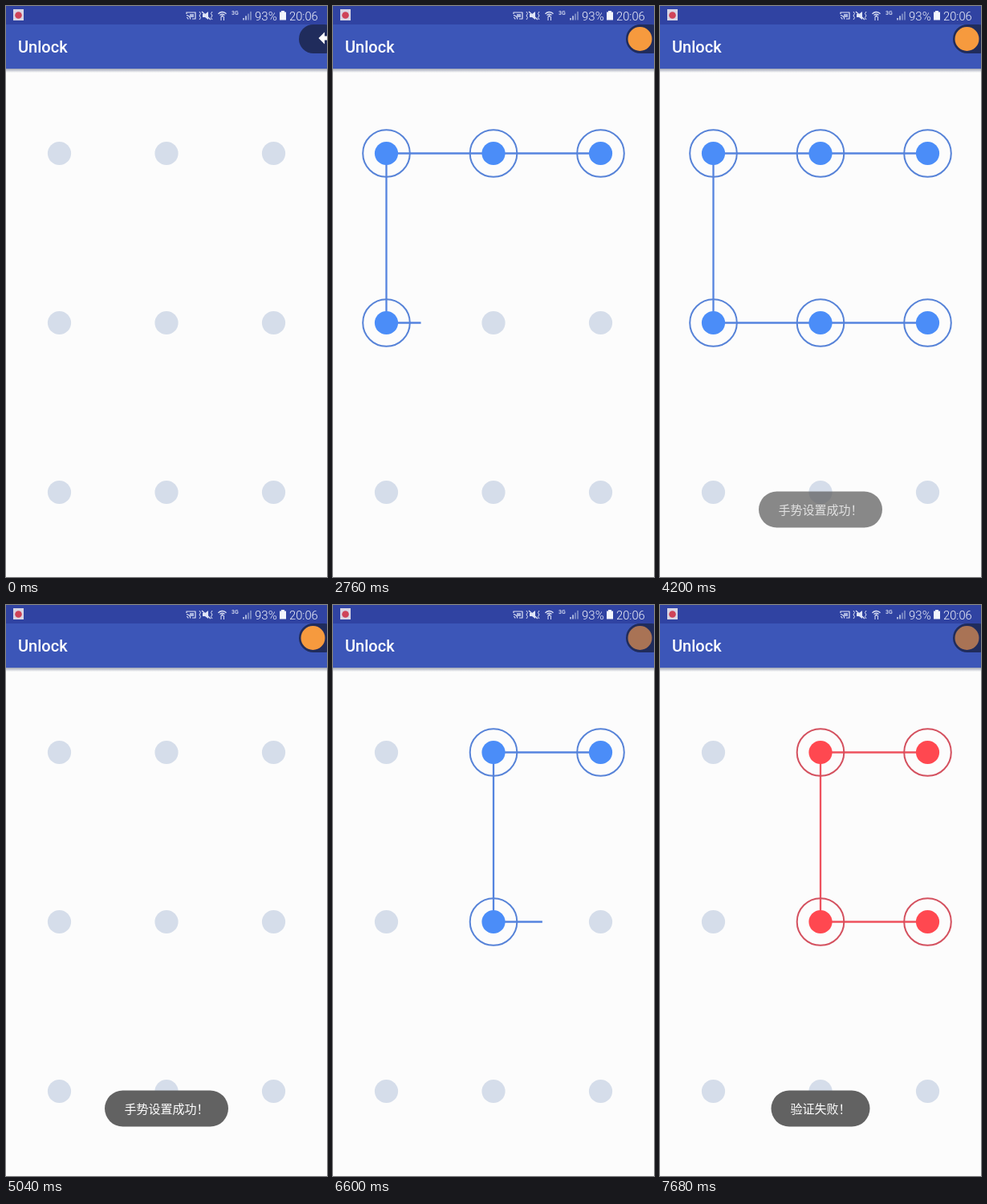
An HTML page with a canvas that plays this animation: 400x711 px, repeating every 8 s.

```html
<!DOCTYPE html>
<html lang="en">
<head>
<meta charset="utf-8">
<title>Unlock</title>
<style>
html, body { margin: 0; width: 100%; height: 100%; overflow: hidden; background: #fcfcfc; }
canvas { display: block; }
</style>
</head>
<body>
<canvas id="stage" width="400" height="711"></canvas>
<script>
const ctx = document.getElementById('stage').getContext('2d');
const LOOP = 8000, STEP = 120;
const COLS = [66.5, 200, 333.5], ROWS = [183.5, 394.5, 605.5];
const NODES = ROWS.flatMap(y => COLS.map(x => ({ x, y })));
const BLUE = { dot: '#4b8df8', ring: '#5783d8', line: '#5584df' };
const RED = { dot: '#ff4850', ring: '#d4515f', line: '#ee525e' };

// Finger stops: [time, node index]
const GESTURES = [
  { stops: [[840, 2], [1220, 1], [1620, 0], [1740, 0], [2400, 3], [2540, 3], [3120, 4], [3660, 5]],
    release: 3840, clear: 5040, result: BLUE },
  { stops: [[5400, 2], [5800, 1], [5920, 1], [6360, 4], [6440, 4], [6780, 5]],
    release: 6840, clear: LOOP, result: RED }
];
const TOASTS = [
  { text: '手势设置成功！', width: 154, start: 3840, end: 5640 },
  { text: '验证失败！', width: 123, start: 6800, end: 9000 }
];

const clamp = v => Math.max(0, Math.min(1, v));
const ease = v => v * v * (3 - 2 * v);

function circle(x, y, r, fill) {
  ctx.beginPath();
  ctx.arc(x, y, r, 0, Math.PI * 2);
  ctx.fillStyle = fill;
  ctx.fill();
}

function rect(x, y, w, h, fill) {
  ctx.fillStyle = fill;
  ctx.fillRect(x, y, w, h);
}

function stroke(points, color, width) {
  ctx.beginPath();
  points.forEach(([x, y]) => ctx.lineTo(x, y));
  ctx.strokeStyle = color;
  ctx.lineWidth = width;
  ctx.stroke();
}

function polygon(points, fill) {
  ctx.beginPath();
  points.forEach(([x, y]) => ctx.lineTo(x, y));
  ctx.fillStyle = fill;
  ctx.fill();
}

function label(text, x, y, font, fill) {
  ctx.font = font;
  ctx.fillStyle = fill;
  ctx.fillText(text, x, y);
}

function arc(x, y, r, from, to, color, width = 1.2) {
  ctx.beginPath();
  ctx.arc(x, y, r, from, to);
  ctx.strokeStyle = color;
  ctx.lineWidth = width;
  ctx.stroke();
}

function drawStatusBar() {
  const ink = '#dfe4f6';
  rect(0, 0, 400, 23, '#3043a2');
  rect(9, 4, 13, 14, '#d8d5e4');
  circle(15.5, 11.5, 4.3, '#cf4358');

  // Cast
  stroke([[225, 10], [225, 8], [236, 8], [236, 16], [232, 16]], ink, 1.2);
  arc(225, 16.5, 2, -Math.PI / 2, 0, ink);
  arc(225, 16.5, 4.8, -Math.PI / 2, 0, ink);
  rect(229, 10, 5, 4, '#aab5e0');

  // Muted, vibrating
  for (const [x, d] of [[241, 1], [257, -1]])
    stroke([[x, 7], [x + d * 1.5, 9.5], [x, 12], [x + d * 1.5, 14.5], [x, 17]], ink, 1);
  polygon([[245, 10], [248, 10], [252, 7], [252, 17], [248, 14], [245, 14]], ink);
  stroke([[244, 7], [255, 17]], ink, 1.4);

  // Wireless
  arc(269.5, 14, 6.5, -2.45, -0.7, ink, 1.4);
  arc(269.5, 14, 3.8, -2.45, -0.7, ink, 1.4);
  circle(269.5, 12.5, 1.2, ink);
  stroke([[268, 13], [268, 18]], ink, 1);
  stroke([[271.5, 13], [271.5, 18]], ink, 1);

  label('3G', 281, 11, '500 7px Roboto, sans-serif', ink);
  for (let i = 0; i < 4; i++)
    rect(295 + i * 3, 15 - i * 2.7, 2, 2.5 + i * 2.7, i < 2 ? '#a9b4de' : '#7484c2');
  label('93%', 310, 17.5, '300 15px Roboto, sans-serif', '#f0f2fb');
  rect(341, 7.5, 8, 10, '#f3f5fc');
  rect(343, 6, 4, 2, '#f3f5fc');
  label('20:06', 353, 17.5, '300 14.7px Roboto, sans-serif', '#f0f2fb');
}

function drawAppBar() {
  rect(0, 23, 400, 55, '#3c56b8');
  const shade = ctx.createLinearGradient(0, 78, 0, 83);
  shade.addColorStop(0, 'rgba(70,80,110,.5)');
  shade.addColorStop(1, 'rgba(70,80,110,0)');
  rect(0, 78, 400, 5, shade);
  label('Unlock', 15, 58, '500 20px Roboto, sans-serif', '#fff');
}

function drawBadge(t) {
  ctx.beginPath();
  ctx.roundRect(365, 23, 50, 36, 18);
  ctx.fillStyle = '#202c5c';
  ctx.fill();
  if (t < 120) {
    polygon([[389.5, 40], [397, 32.5], [397, 37.5], [400, 37.5], [400, 42.5], [397, 42.5], [397, 47.5]], '#fff');
  } else {
    circle(382.5, 41, 15, t < 5400 ? '#f69a3e' : '#a97355');
  }
}

function fingerAt(stops, t) {
  const next = stops.findIndex(s => s[0] > t);
  if (next < 0) return NODES[stops[stops.length - 1][1]];
  const [t0, from] = stops[next - 1], [t1, to] = stops[next];
  const k = ease((t - t0) / (t1 - t0)), a = NODES[from], b = NODES[to];
  return { x: a.x + (b.x - a.x) * k, y: a.y + (b.y - a.y) * k };
}

function drawPattern(t) {
  const gesture = GESTURES.find(g => t >= g.stops[0][0] && t < g.clear);
  let lit = [], colors = BLUE, path = [];
  if (gesture) {
    const held = t < gesture.release;
    const finger = fingerAt(gesture.stops, t);
    const near = n => Math.hypot(n.x - finger.x, n.y - finger.y) < 30;
    lit = gesture.stops.filter(([time, i]) => time <= t || (time - t < 400 && near(NODES[i])))
      .map(([, i]) => NODES[i]);
    colors = held ? BLUE : gesture.result;
    path = held ? [...lit, finger] : lit;
  }
  if (path.length > 1) {
    ctx.lineJoin = 'round';
    stroke(path.map(n => [n.x, n.y]), colors.line, 2.3);
  }
  for (const n of NODES) {
    const on = lit.includes(n);
    if (on) arc(n.x, n.y, 29.3, 0, Math.PI * 2, colors.ring, 2);
    circle(n.x, n.y, 14.6, on ? colors.dot : '#d5ddea');
  }
}

function drawToast({ text, width, start, end }, t) {
  const alpha = Math.min(clamp((t - start) / 480), 1 - clamp((t - end) / 400));
  if (alpha <= 0) return;
  ctx.save();
  ctx.globalAlpha = alpha;
  ctx.beginPath();
  ctx.roundRect(200 - width / 2, 604.5, width, 45, 22.5);
  ctx.fillStyle = '#626262';
  ctx.fill();
  ctx.textAlign = 'center';
  label(text, 200, 633, '300 15px "Noto Sans CJK SC", "Noto Sans CJK", sans-serif', '#fff');
  ctx.restore();
}

function render(now) {
  const t = Math.floor((now % LOOP) / STEP) * STEP;
  rect(0, 0, 400, 711, '#fcfcfc');
  drawStatusBar();
  drawAppBar();
  drawPattern(t);
  TOASTS.forEach(toast => drawToast(toast, t));
  drawBadge(t);
}

const began = performance.now();
function loop() {
  render(performance.now() - began);
  requestAnimationFrame(loop);
}
loop();
</script>
</body>
</html>
```
